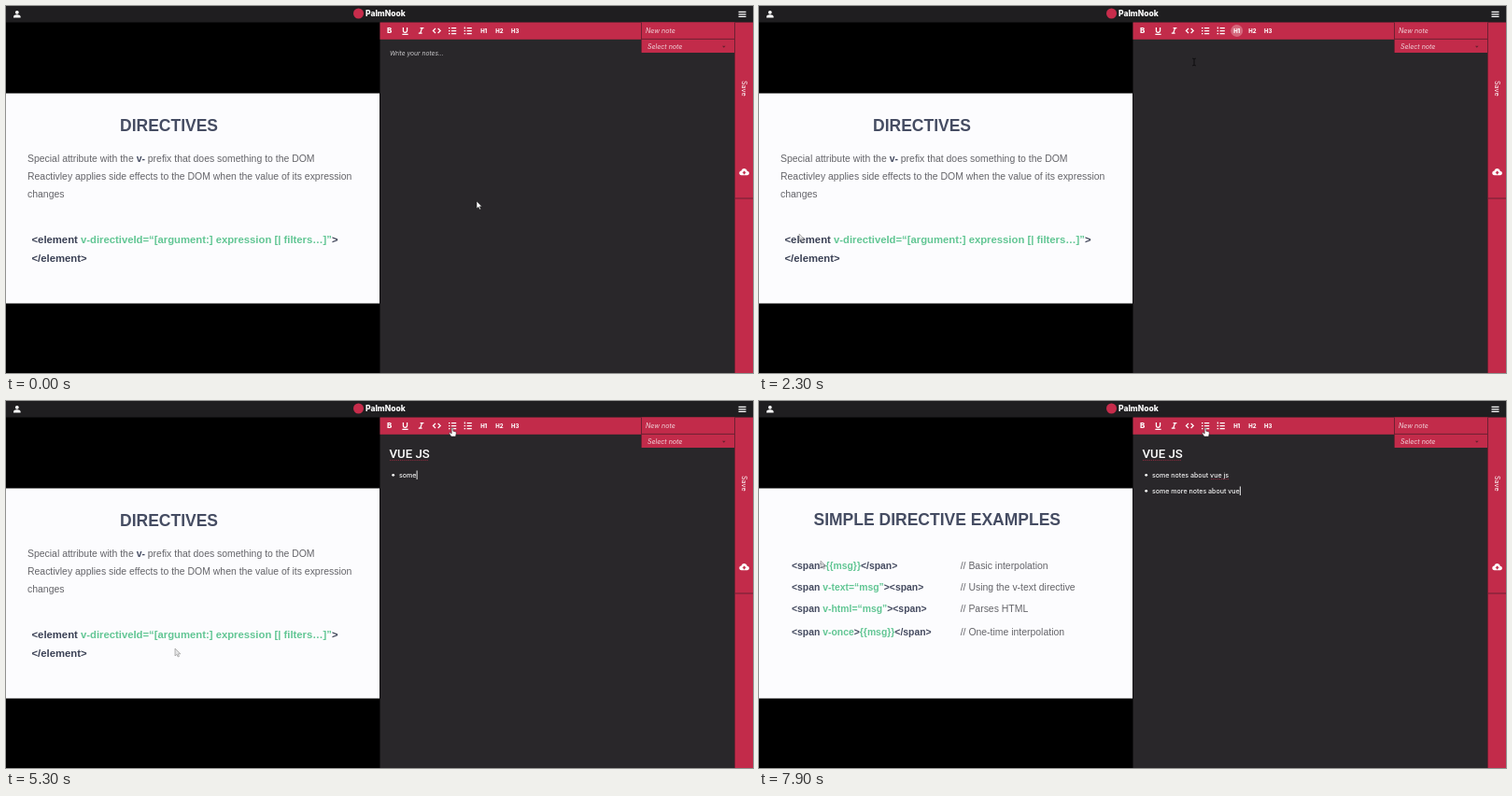
Recreate the animation shown at these times as an HTML page. Size 800x393 px, loop 8000 ms.

```html
<!DOCTYPE html>
<html lang="en">
<head>
<meta charset="utf-8">
<style>
  html, body { margin: 0; width: 100%; height: 100%; overflow: hidden; background: #000; }
  svg { display: block; width: 800px; height: 393px; }
  text { white-space: pre; font-family: Inter, sans-serif; }
  .slide text { font: 10.45px "Liberation Sans", Arial, sans-serif; fill: #646469; }
  .slide .title { font-size: 17.5px; font-weight: bold; fill: #454c62; }
  .slide .code { font-size: 11.3px; font-weight: bold; fill: #3a4054; }
  #examples .code { font-size: 10.4px; fill: #454b60; }
  .slide .hi { fill: #62c694; }
  .note { font-size: 7.05px; font-weight: 500; fill: #f4f4f4; }
  .field { font-size: 7.05px; font-style: italic; fill: #f0d5db; }
  .tool { font-size: 6px; font-weight: 800; fill: #fff; text-anchor: middle; }
  .line { fill: none; stroke: #fff; stroke-width: 1.2; }
  .spell { stroke: #a52b43; stroke-width: .8; stroke-dasharray: 1.2 1; }
</style>
</head>
<body>
<svg viewBox="0 0 800 393">
  <defs>
    <path id="arrowShape" d="M0 0V8L1.9 6.3 3.2 9 4.5 8.4 3.3 5.8H5.8Z"/>
  </defs>

  <rect width="800" height="393"/>
  <rect y="93.5" width="400" height="225" fill="#fcfcfe"/>
  <g class="slide" id="directives">
    <text class="title" x="122" y="134.3">DIRECTIVES</text>
    <text x="23" y="167">Special attribute with the <tspan font-weight="bold" fill="#454c62">v-</tspan> prefix that does something to the DOM</text>
    <text x="23" y="186">Reactivley applies side effects to the DOM when the value of its expression</text>
    <text x="23" y="205">changes</text>
    <text class="code" x="27.5" y="254">&lt;element <tspan class="hi">v-directiveId=“[argument:] expression [| filters…]”</tspan>&gt;</text>
    <text class="code" x="27.5" y="274">&lt;/element&gt;</text>
  </g>
  <g class="slide" id="examples">
    <text class="title" x="58.5" y="133">SIMPLE DIRECTIVE EXAMPLES</text>
    <text class="code" x="35" y="180">&lt;span&gt;<tspan class="hi">{{msg}}</tspan>&lt;/span&gt;</text>
    <text class="code" x="35" y="203">&lt;span <tspan class="hi">v-text=“msg”</tspan>&gt;&lt;span&gt;</text>
    <text class="code" x="35" y="226">&lt;span <tspan class="hi">v-html=“msg”</tspan>&gt;&lt;span&gt;</text>
    <text class="code" x="35" y="251">&lt;span <tspan class="hi">v-once</tspan>&gt;<tspan class="hi">{{msg}}</tspan>&lt;/span&gt;</text>
    <text x="215.7" y="180">// Basic interpolation</text>
    <text x="215.7" y="203">// Using the v-text directive</text>
    <text x="215.7" y="226">// Parses HTML</text>
    <text x="215.7" y="251">// One-time interpolation</text>
  </g>
  <use id="videoMouse" href="#arrowShape" fill="#ddd" stroke="#666" stroke-width="1.2"/>

  <!-- header -->
  <rect width="800" height="17.5" fill="#1f1e20"/>
  <g fill="#fff">
    <circle cx="11.8" cy="6.8" r="1.9"/>
    <path d="M8 12.5V11.4C8 8.6 15.6 8.6 15.6 11.4V12.5Z"/>
    <text x="385" y="11.2" font-size="8.5" font-weight="800">PalmNook</text>
  </g>
  <circle cx="377.5" cy="8" r="5.5" fill="#c72c4b"/>
  <path class="line" d="M784.5 6.3h8M784.5 8.8h8M784.5 11.3h8"/>

  <!-- editor -->
  <rect x="400.5" y="17.5" width="399.5" height="375.5" fill="#29272a"/>
  <rect x="400.5" y="17.5" width="380" height="18.3" fill="#c22b4a"/>
  <rect x="680.5" y="17.5" width="100" height="32.5" fill="#c22b4a"/>
  <rect x="780.5" y="17.5" width="19.5" height="375.5" fill="#c22b4a"/>
  <path d="M680.5 17.5V50M680.5 35.4H780.5M780.5 17.5V393M780.5 206H800" stroke="#6d2032" fill="none"/>
  <text class="field" x="685" y="29.4">New note</text>
  <text class="field" x="687" y="45.8">Select note</text>
  <path d="M767 42.8h3.6l-1.8 1.9z" fill="#65202f"/>
  <text transform="translate(787.6 80) rotate(90)" font-size="7.2" fill="#fff">Save</text>
  <path d="M787.7 181.2c-3.2 0-3.2-4.4-.2-4.7c.8-3.4 5.6-3.3 6.2.2c3 .2 2.9 4.5 0 4.5z" fill="#fff"/>
  <path d="M790.6 176.4l2.2 2.3h-1.4v1.6h-1.6v-1.6h-1.4z" fill="#c22b4a"/>

  <!-- toolbar -->
  <circle id="h1On" cx="511.7" cy="26.5" r="6.5" fill="#e0919f" opacity=".6"/>
  <text class="tool" x="410.6" y="29.3" style="font-size:8px">B</text>
  <path class="line" d="M425.4 23v3.3a2.1 2.1 0 0 0 4.2 0V23M424.4 30.3h6.2"/>
  <path class="line" d="M443.6 23.6h3.8M441.8 29.2h3.8M445.6 23.6L443.6 29.2"/>
  <path class="line" d="M460 24l-2.6 2.5 2.6 2.5M462.6 24l2.6 2.5-2.6 2.5"/>
  <path class="line" d="M477 23.6h5.2M477 26.6h5.2M477 29.6h5.2M493.6 23.6h5.2M493.6 26.6h5.2M493.6 29.6h5.2"/>
  <path class="line" d="M474 23.6h1.5M474 26.6h1.5M474 29.6h1.5M491.3 22.6v2M490.6 26.6h1.5M490.6 29.6h1.5"/>
  <text class="tool" x="511.7" y="28.7">H1</text>
  <text class="tool" x="528.5" y="28.7">H2</text>
  <text class="tool" x="545.2" y="28.7">H3</text>

  <!-- notes -->
  <text id="hint" x="411" y="52.6" font-size="6.7" font-style="italic" fill="#c9c8ca">Write your notes...</text>
  <text id="heading" x="410.5" y="61" style="font:500 13.2px Roboto,sans-serif" fill="#fff"></text>
  <path id="spell1" class="spell" d="M411 63.4H452"/>
  <circle id="dot1" cx="414.7" cy="79.3" r="1.4" fill="#fff"/>
  <text id="item1" class="note" x="421" y="81.6"></text>
  <path id="spell2" class="spell" d="M484 83.6H503"/>
  <circle id="dot2" cx="414.7" cy="96.3" r="1.4" fill="#fff"/>
  <text id="item2" class="note" x="421" y="98.6"></text>
  <rect id="caret" width=".9" fill="#fff"/>

  <g id="mouse">
    <use id="arrow" href="#arrowShape" fill="#fff" stroke="#111" stroke-width=".5"/>
    <path id="beam" d="M-1.8-3.8Q0-3.8 0-3V3Q0 3.8-1.8 3.8M1.8-3.8Q0-3.8 0-3M0 3Q0 3.8 1.8 3.8" fill="none" stroke="#0b0a0b" stroke-width=".9"/>
    <path id="hand" d="M-.8 0Q0-.9.8 0V3.2L3.6 4Q4.4 4.4 4.2 5.5L3.5 9H-1.2L-3.4 5.6Q-3.2 4.4-2 5L-.8 6Z" fill="#fff" stroke="#222" stroke-width=".5"/>
  </g>
</svg>
<script>
const $ = id => document.getElementById(id);
const show = (id, on) => $(id).style.display = on ? "" : "none";

const mousePath = [[100, 504, 209], [850, 481, 56], [1200, 481, 56], [1750, 512, 27],
  [1950, 512, 27], [2250, 466, 60], [4050, 466, 60], [4500, 478, 29]];
const videoPath = [[900, 125, 269], [1300, 125, 269], [2200, 43, 244], [2600, 43, 244],
  [3300, 193, 246], [3900, 193, 246], [5000, 181, 265], [5600, 181, 265],
  [6250, 235, 252], [6700, 235, 252], [7700, 66, 171]];

// Eased position along [time, x, y] keys
function along(keys, t) {
  const i = keys.findIndex(k => k[0] > t);
  if (i === 0) return keys[0].slice(1);
  if (i < 0) return keys[keys.length - 1].slice(1);
  const [t0, x0, y0] = keys[i - 1], [t1, x1, y1] = keys[i];
  const p = (t - t0) / (t1 - t0), e = p * p * (3 - 2 * p);
  return [x0 + (x1 - x0) * e, y0 + (y1 - y0) * e];
}

function type(id, str, t, start, step) {
  $(id).textContent = str.slice(0, Math.max(0, Math.floor((t - start) / step) + 1));
}

function place(id, [x, y]) {
  $(id).setAttribute("transform", `translate(${x} ${y})`);
}

function setCaret(x, y, h) {
  for (const [k, v] of Object.entries({ x, y, height: h })) $("caret").setAttribute(k, v);
}

function draw(now) {
  const t = now % 8000;
  const pos = along(mousePath, t);
  place("mouse", pos);
  show("hand", pos[1] < 37);
  show("beam", pos[1] >= 37 && pos[1] < 66);
  show("arrow", pos[1] >= 66);
  place("videoMouse", along(videoPath, t));
  $("videoMouse").style.opacity = t < 500 ? 0 : .75;
  $("videoMouse").style.strokeWidth = .6;

  show("directives", t < 5900);
  show("examples", t >= 5900);
  show("hint", t < 1900);
  show("h1On", t >= 1900 && t < 4100);
  show("spell1", t >= 4100);
  show("dot1", t >= 4650);
  show("spell2", t >= 6650);
  show("dot2", t >= 6650);

  type("heading", "VUE JS", t, 2950, 190);
  type("item1", "some notes about vue js", t, 5100, 64);
  type("item2", "some more notes about vue", t, 6800, 45);

  const end = (id, x) => x + $(id).getComputedTextLength() + .2;
  show("caret", t >= 1900 && (t < 2300 || t > 2800));
  if (t < 4100) setCaret(end("heading", 410.5), 48, 18);
  else if (t < 4650) setCaret(411, 74.5, 9.5);
  else if (t < 6650) setCaret(end("item1", 421), 74.5, 9.5);
  else setCaret(end("item2", 421), 91.5, 9.5);

  requestAnimationFrame(draw);
}
requestAnimationFrame(draw);
</script>
</body>
</html>
```
